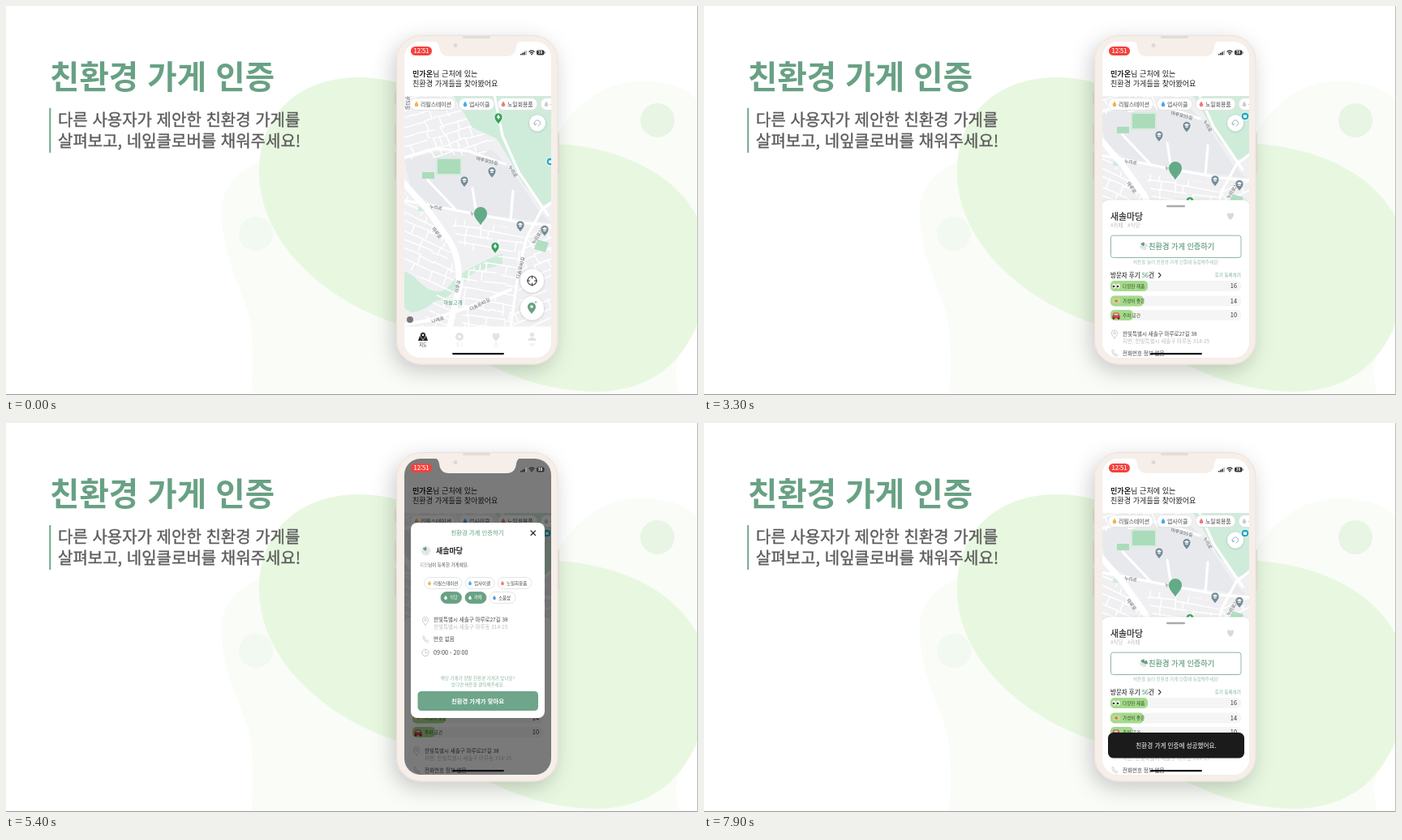
An HTML page that plays this animation: 853x480 px, repeating every 8 s.

```html
<!DOCTYPE html>
<html lang="ko">
<head>
<meta charset="utf-8">
<style>
html,body{margin:0;width:100%;height:100%;overflow:hidden;background:#fff}
svg{display:block;width:853px;height:480px;font-family:"Noto Sans CJK KR","Noto Sans KR","Noto Sans",sans-serif}
</style>
</head>
<body>
<svg id="stage" viewBox="0 0 853 480" lang="ko"></svg>
<script>
const GREEN = '#68a184', PALE = '#bcbcbc';
const SHOP = '새솔마당', ROAD = '한빛특별시 새솔구 마루로27길 38', LOT = '한빛특별시 새솔구 마루동 314-25';

// Text is placed by the vertical centre of its line; a hairline stroke gives the medium weight.
const text = (x, y, size, fill, str, weight = 400, anchor = 'start', turn = 0) =>
  `<text x="${x}" y="${y + size * .37}" font-size="${size}" fill="${fill}" font-weight="${weight}" text-anchor="${anchor}"${weight == 500 ? ` stroke="${fill}" stroke-width="${size * .018}"` : ''}${turn ? ` transform="rotate(${turn} ${x} ${y})"` : ''}>${str}</text>`;
const box = (x1, y1, x2, y2, r, fill, extra = '') =>
  `<rect x="${x1}" y="${y1}" width="${x2 - x1}" height="${y2 - y1}" rx="${r}" fill="${fill}" ${extra}/>`;
const dot = (x, y, r, fill, extra = '') => `<circle cx="${x}" cy="${y}" r="${r}" fill="${fill}" ${extra}/>`;
const shape = (d, fill, extra = '') => `<path d="${d}" fill="${fill}" ${extra}/>`;
const line = (d, stroke, width, extra = '') =>
  `<path d="${d}" fill="none" stroke="${stroke}" stroke-width="${width}" stroke-linecap="round" stroke-linejoin="round" ${extra}/>`;
const at = (x, y, scale, body, turn = 0) => `<g transform="translate(${x} ${y}) rotate(${turn}) scale(${scale})">${body}</g>`;

const PIN = 'M0 9C-1.5 6-5 4-5 0A5 5 0 0 1 5 0C5 4 1.5 6 0 9Z';
const HEART = 'M0 0C-5-4-4-8-1.8-8-.8-8 0-7 0-6.3 0-7 .8-8 1.8-8 4-8 5-4 0 0Z';
const DROP = 'M0-3.5C1-1.5 2.4-.5 2.4 1A2.4 2.4 0 0 1-2.4 1C-2.4-.5-1-1.5 0-3.5Z';
const PHONE = 'M-3-3.5C-4-2-1 3 2.5 3.8L4 2.4 2 .8 .8 1.5-1.2-1-.5-2-1.7-4Z';

const clover = (x, y, scale, n) => at(x, y, scale,
  [0, 1, 2, 3].map(i => `<g transform="rotate(${i * 90 - 20})">${shape(HEART, i < n ? '#5f9f7f' : '#dfe4e1')}</g>`).join(''));
const pin = (x, y, fill, glyph) => at(x, y, 1, shape(PIN, fill, 'stroke="#fff" stroke-width=".7"') + shape(glyph, '#fff'));
const school = (x, y) => pin(x, y, '#738b96', 'M-3.2-.8 0-2.5 3.2-.8 0 .8ZM-1.8.7 0 1.6 1.8.7V2L0 2.8-1.8 2Z');
const tree = (x, y) => pin(x, y, '#37a15b', 'M0-3.2 2.3 1H.6V2.8H-.6V1H-2.3Z');
const place = (x, y) => at(x, y, .72, line(PIN, PALE, 1) + dot(0, 0, 1.8, 'none', `stroke="${PALE}"`));
const phone = (x, y) => at(x, y, 1, line(PHONE, PALE, .7));
const chip = (x1, x2, y, h, str, size, tx, icon, on) =>
  box(x1, y - h / 2, x2, y + h / 2, h / 2, on ? GREEN : '#fff', `stroke="${on ? GREEN : '#dcdfe0'}" stroke-width=".8"`) +
  at(tx - 5, y, size / 7, shape(DROP, icon)) + text(tx, y, size, on ? '#fff' : '#444', str);

let seed = 7;
const rand = () => (seed = seed * 16807 % 2147483647) / 2147483647;

// Small streets: a loose rotated grid, cut to a district's outline.
function streets(id, outline, cx, cy, turn) {
  let d = '';
  for (let v = -90; v < 90; v += 9 + rand() * 4)
    for (let u = -100; u < 100;) {
      const len = 15 + rand() * 35;
      d += `M${u} ${v}l${len} ${rand() * 4 - 2}`;
      if (rand() < .75) d += `M${u} ${v}l${rand() * 3} ${10 + rand() * 5}`;
      if (rand() < .6) d += `M${u + len / 2} ${v}v10`;
      u += len + (rand() < .35 ? 8 : 0);
    }
  return `<clipPath id="${id}"><path d="${outline}"/></clipPath><g clip-path="url(#${id})">${at(cx, cy, 1, line(d, '#fff', 1.5), turn)}</g>`;
}

const background =
  shape('M266 255C266 220 285 198 350 178L500 150 680 157C700 125 735 93 780 93 815 93 840 100 853 118V400C830 420 820 440 830 480H302C305 455 306 425 300 385 290 345 266 310 266 255Z', '#fafcf8') +
  shape('M312 205C312 130 365 88 435 88 530 88 575 165 680 170 770 176 830 215 853 262V390C830 450 785 476 725 476 620 474 570 420 482 392 390 362 312 290 312 205Z', '#e8f8e0') +
  dot(803, 141, 21, '#e8f4e4') + dot(308, 281, 21, '#f1f9f1') +
  box(0, 479, 853, 480, 0, '#999') + box(852, 0, 853, 480, 0, '#bbb');

const heading =
  text(54, 87, 39.6, GREEN, '친환경 가게 인증', 700) +
  box(53.3, 126, 55.3, 181, 0, '#6fa588') +
  text(64, 140.5, 20, '#5c5c5c', '다른 사용자가 제안한 친환경 가게를', 500) +
  text(64, 166.5, 20, '#5c5c5c', '살펴보고, 네잎클로버를 채워주세요!', 500);

const body =
  box(479, 106, 483, 122, 1.5, '#eee4de') + box(479, 146, 483, 172, 1.5, '#eee4de') +
  box(479, 180, 483, 213, 1.5, '#eee4de') + box(678, 156, 682, 207, 1.5, '#eee4de') +
  box(481.5, 36.5, 680, 442, 30, '#f6eee9', 'stroke="#ebe0da" filter="url(#shadow)"') +
  box(563, 37, 597, 40, 1.5, '#e2dcd8');

const map =
  box(485, 100, 685, 400, 0, '#f0f0f3') +
  shape('M491 190 530 180 600 178 625 205 655 250 672 268 580 256 530 247 500 230Z', '#e8e9ed') +
  shape('M545 100 575 150 605 164 622 192 638 220 662 246 685 238V100Z', '#cfecdb') +
  shape('M491 328C505 330 512 350 530 352 545 354 548 340 558 332 575 322 597 310 612 306V318C597 325 585 322 572 333 555 350 545 362 530 364 515 375 500 384 491 372Z', '#cfecdb') +
  streets('west', 'M491 230 545 290 553 330 548 396H510L535 350 491 325Z', 520, 310, 24) +
  streets('middle', 'M548 262 640 276 625 396H562L562 330 612 306 560 300Z', 595, 325, 9) +
  streets('east', 'M644 276 685 268V396H624Z', 655, 330, -24) +
  streets('north', 'M491 111H548L575 150 604 166 590 182 491 190Z', 535, 150, -17) +
  box(530, 187, 562, 209, 1, '#d9eadf') + box(532, 189, 560, 207, 1, '#aadcba') +
  box(513, 205, 528, 213, 0, '#aadcba') + box(508, 248, 520, 253, 0, '#cfecdb') +
  shape('M655 288 669 292 665 304 651 300Z', '#b2dfc2') +
  line('M491 187 530 176 570 179 615 195M491 240 530 247 580 257 640 268 685 272M600 100 612 160 632 205 668 258M685 232 660 252 642 285 632 325 622 396M520 215 555 252M575 225 580 257M625 228 622 265', '#fff', 3.2) +
  line('M480 395 525 387 580 368 622 350', '#fff', 4) +
  line('M485 212 520 252 545 287C556 305 559 320 558 350L546 400', '#fff', 7.5) +
  [[495, 117, '마루51길', 90], [593, 191, '마루로55길', 14], [625, 204, '누리로', 60], [530, 248.5, '누리로', 10],
   [580, 257, '누리로', 8], [531, 280, '마루로', 55], [557, 346, '마루로', -80], [656, 283, '누리로2길', -58],
   [634, 323, '다솜로40길', -76], [584, 368, '다솜로40길', -28], [532, 387, '나래로', -18]]
    .map(([x, y, s, turn]) => text(x, y, 5.7, '#555c62', s, 400, 'middle', turn)).join('') +
  text(551, 366, 6.2, '#3d9067', '하늘고개', 400, 'middle') +
  dot(671, 192, 5, '#25a9c4', 'stroke="#fff"') + box(669, 190.5, 673, 194, .7, '#fff') +
  tree(607, 137) + tree(603, 296.5) +
  school(565, 215) + school(599, 203.5) + school(634, 270) + school(664, 275.5) +
  at(585, 256, 1.6, shape(PIN, '#62ab86'));

const floating = (x, y, r) => dot(x, y, r, '#fff', 'filter="url(#soft)"');
const home =
  box(485, 40, 680, 111, 0, '#fff') +
  text(501, 84, 9.1, '#222', '<tspan font-weight="700">민가온</tspan>님 근처에 있는') +
  text(501, 96, 9.1, '#222', '친환경 가게들을 찾아봤어요') +
  chip(498, 554, 121, 15, '리필스테이션', 6.9, 511, '#efb54c') +
  chip(558, 602, 121, 15, '업사이클', 6.9, 571, '#4aa9e8') +
  chip(606, 655, 121, 15, '노일회용품', 6.9, 618, '#ec7d76') +
  chip(659, 700, 121, 15, '식당', 6.9, 671, '#ccc') +
  floating(655, 144.5, 10) + line('M652 146.5A3.6 3.6 0 1 1 656 148M652 146.5l-1.4-1.8M652 146.5l2-.8', '#9bb2bd', 1) +
  floating(648.5, 339, 14.5) + dot(648.5, 339, 5.5, 'none', 'stroke="#333" stroke-width="1.1"') +
  line('M648.5 333v3M648.5 342v3M642.5 339h3M651.5 339h3', '#333', 1.1) +
  floating(648.5, 373, 14.5) + at(648, 371, 1, shape(PIN, GREEN)) + dot(648, 371, 1.8, '#fff') + text(653, 366, 6, GREEN, '+', 700, 'middle') +
  dot(498, 387, 4, '#777') +
  box(485, 395.5, 680, 440, 0, '#fff') +
  shape('M508 413 510 407H518L520 413Z', '#222') + at(514, 406, .7, shape(PIN, '#222', 'stroke="#fff" stroke-width="1"')) + dot(514, 406, 1.2, '#fff') +
  dot(559, 408, 5, '#e3e3e3') + dot(559, 408, 1.8, '#fff') +
  at(604, 413.5, 1.25, shape(HEART, '#e3e3e3')) +
  dot(648.5, 405.5, 2.6, '#e3e3e3') + shape('M643.5 413C643.5 407.5 653.5 407.5 653.5 413Z', '#e3e3e3') +
  ['지도', '후기', '찜', 'MY'].map((s, i) => text(514 + i * 45, 418.5, 5.2, i ? '#e0e0e0' : '#333', s, 400, 'middle')).join('');

const emoji = [
  [505.5, 510.5].map(x => `<ellipse cx="${x}" cy="106" rx="2.2" ry="3" fill="#fff"/>` + dot(x - .5, 106.5, 1.3, '#222')).join(''),
  box(503.5, 121.5, 513, 127.5, 1, '#d9cf8e') + dot(508.2, 124.5, 1.8, '#7a9b62'),
  shape('M503 144 505 139H511L513 144V146H503Z', '#d6423c') + box(505.5, 140, 510.5, 142, .5, '#bfe0f0') + dot(505, 146, 1.2, '#333') + dot(511, 146, 1.2, '#333')
];
const review = ([y, width, label, count], i) =>
  box(501, y - 6.5, 662, y + 6.5, 5, '#f5f5f6') + box(501, y - 6.5, 501 + width, y + 6.5, 5, '#a4da8c') + emoji[i] +
  text(516, y, 5.6, '#36512c', label) + text(657, y, 7.4, '#333', count, 400, 'end');
const state = (id, tags, n) => `<g id="${id}">${text(501, 31.5, 6.4, PALE, tags[0])}${text(522, 31.5, 6.4, PALE, tags[1])}${clover(542, 57, .62, n)}</g>`;
const sheet =
  box(490, 0, 673, 250, 9, '#fff', 'filter="url(#soft)"') +
  box(570, 6.3, 593, 8.8, 1.2, '#aaa') +
  text(501, 20, 10.9, '#222', SHOP, 500) + at(649, 24.5, 1.1, shape(HEART, '#d9d9d9')) +
  box(501.5, 43.7, 662, 71, 3, '#fff', 'stroke="#8db7a2"') +
  state('before', ['#카페', '#식당'], 1) + state('after', ['#식당', '#카페'], 2) +
  text(548, 57, 9.2, '#5f9a7c', '친환경 가게 인증하기', 500) +
  text(582, 76, 5.5, '#9dbfae', '버튼을 눌러 친환경 가게 인증에 동참해주세요!', 400, 'middle') +
  text(501, 92.7, 7.5, '#222', `방문자 후기 <tspan fill="${GREEN}" stroke="${GREEN}">56</tspan>건`, 500) +
  line('M560.5 90l2.6 2.7-2.6 2.7', '#333', 1.1) +
  text(662, 92.5, 5.6, '#74ab8d', '후기 등록하기', 400, 'end') +
  [[106, 46, '다양한 제품', 16], [124.5, 41, '가성비 좋은', 14], [142, 28, '주차 공간', 10]].map(review).join('') +
  place(506, 164) + text(516, 165, 6.5, '#444', ROAD) + text(516, 174.5, 6.5, PALE, '지번: ' + LOT) +
  phone(506, 189) + text(516, 189, 6.5, '#444', '전화번호 정보 없음');

const modal =
  box(499, 123, 664, 364, 8, '#fff') +
  text(581, 135.5, 7.35, '#74ab8d', '친환경 가게 인증하기', 500, 'middle') +
  line('M647 133l5.5 5.5M652.5 133l-5.5 5.5', '#222', 1.1) +
  dot(517.5, 157.5, 6.5, '#eff1f0') + clover(517.5, 158, .6, 1) +
  text(530, 157.5, 9, '#222', SHOP, 700) +
  text(510, 175, 5.5, '#555', '<tspan fill="#9ab0a4">회원</tspan>님이 등록한 가게에요.') +
  chip(515.5, 562, 197.5, 14, '리필스테이션', 5.5, 527, '#efb54c') +
  chip(566, 602, 197.5, 14, '업사이클', 5.5, 577, '#4aa9e8') +
  chip(606, 648, 197.5, 14, '노일회용품', 5.5, 617, '#ec7d76') +
  chip(536, 561.5, 215.5, 14, '식당', 5.3, 547, '#fff', true) +
  chip(566, 592, 215.5, 14, '카페', 5.3, 577, '#fff', true) +
  chip(596, 628, 215.5, 14, '소품샵', 5.5, 607, '#5b9bdd') +
  place(517, 243) + text(527, 243, 6.5, '#444', ROAD) + text(527, 251.7, 6.5, PALE, LOT) +
  phone(517, 267) + text(527, 266.8, 6.5, '#444', '번호 없음') +
  dot(517, 283.5, 4.2, 'none', `stroke="${PALE}" stroke-width=".8"`) + line('M517 281v2.7h2', PALE, .8) +
  text(527, 283.5, 7.2, '#444', '09:00 - 20:00') +
  text(581.5, 315, 5.5, '#8bb79f', '해당 가게가 정말 친환경 가게가 맞나요?', 400, 'middle') +
  text(581.5, 322.5, 5.5, '#8bb79f', '맞다면 버튼을 클릭해주세요.', 400, 'middle') +
  box(507.5, 331, 656, 355, 4.5, '#6ea58b') +
  text(581.5, 343, 7.35, '#fff', '친환경 가게가 맞아요', 700, 'middle');

const toast = box(498, 382, 666, 413.5, 6.5, '#1b1b1b') + text(582, 397.7, 7.6, '#fff', '친환경 가게 인증에 성공했어요.', 400, 'middle');

const status =
  box(499, 50, 525, 61, 5.5, '#f4413b') + text(512, 55.4, 7.6, '#fff', '12:51', 500, 'middle') +
  [0, 1, 2, 3].map(i => box(634 + i * 2.1, 59 - i * 1.3, 635.5 + i * 2.1, 60.5, .3, i < 3 ? '#222' : '#aaa')).join('') +
  line('M645 56.3Q648 53.8 651 56.3M646.3 58Q648 56.7 649.7 58', '#222', 1.2) + dot(648, 59.6, .9, '#222') +
  box(654, 54.5, 663.5, 60.5, 1.8, '#333') + box(664, 56.5, 665, 58.5, .4, '#777') + text(658.5, 57.4, 4.8, '#fff', '38', 700, 'middle') +
  box(550, 428, 614, 430.2, 1.1, '#111');

const stage = document.getElementById('stage');
stage.innerHTML = `<defs>
  <filter id="shadow" x="-40%" y="-20%" width="180%" height="150%"><feDropShadow dx="-4" dy="8" stdDeviation="13" flood-opacity=".2"/></filter>
  <filter id="soft" x="-40%" y="-40%" width="180%" height="180%"><feDropShadow dx="0" dy=".5" stdDeviation="1.8" flood-opacity=".22"/></filter>
  <clipPath id="screen"><rect x="491" y="44" width="181" height="390" rx="20"/></clipPath>
  <clipPath id="view"><rect x="491" y="111" width="181" height="285"/></clipPath></defs>
  ${background}${heading}${body}
  <g clip-path="url(#screen)">
    ${box(490, 44, 673, 435, 0, '#fff')}
    <g clip-path="url(#view)"><g id="map">${map}</g></g>${home}
    <g id="sheet">${sheet}</g>
    <g id="shade">${box(490, 44, 673, 435, 0, '#000', 'fill-opacity=".52"')}</g>
    <g id="modal">${modal}</g>
    <g id="toast">${toast}</g>${status}
  </g>
  ${shape('M528 43Q533 44 534 50 535 62 546 62H617Q628 62 629 50 630 44 635 43Z', '#f6eee9')}${dot(554, 48.5, 2.5, '#e0d8d2')}`;

const part = id => document.getElementById(id);
const ramp = (t, from, to) => Math.min(1, Math.max(0, (t - from) / (to - from)));
const easeOut = u => 1 - (1 - u) ** 3;

function draw(now) {
  const t = Math.floor(now % 8000 / 100) * 100; // ten pictures a second
  const pan = easeOut(ramp(t, 600, 1000));
  const top = 436 - 118 * easeOut(ramp(t, 900, 1100)) - 78.5 * easeOut(ramp(t, 1900, 2650));
  const done = t >= 7300;
  const dialog = ramp(t, 4000, 4200) * (1 - ramp(t, 7300, 7500));
  part('map').setAttribute('transform', `translate(${-4 * pan} ${-56 * pan})`);
  part('sheet').setAttribute('transform', `translate(0 ${top})`);
  part('sheet').setAttribute('visibility', t > 900 ? 'visible' : 'hidden');
  part('before').setAttribute('display', done ? 'none' : 'inline');
  part('after').setAttribute('display', done ? 'inline' : 'none');
  part('shade').setAttribute('opacity', dialog);
  part('modal').setAttribute('opacity', dialog);
  part('toast').setAttribute('opacity', ramp(t, 7400, 7600));
}
const start = performance.now();
function tick() {
  draw(performance.now() - start);
  requestAnimationFrame(tick);
}
tick();
</script>
</body>
</html>
```
